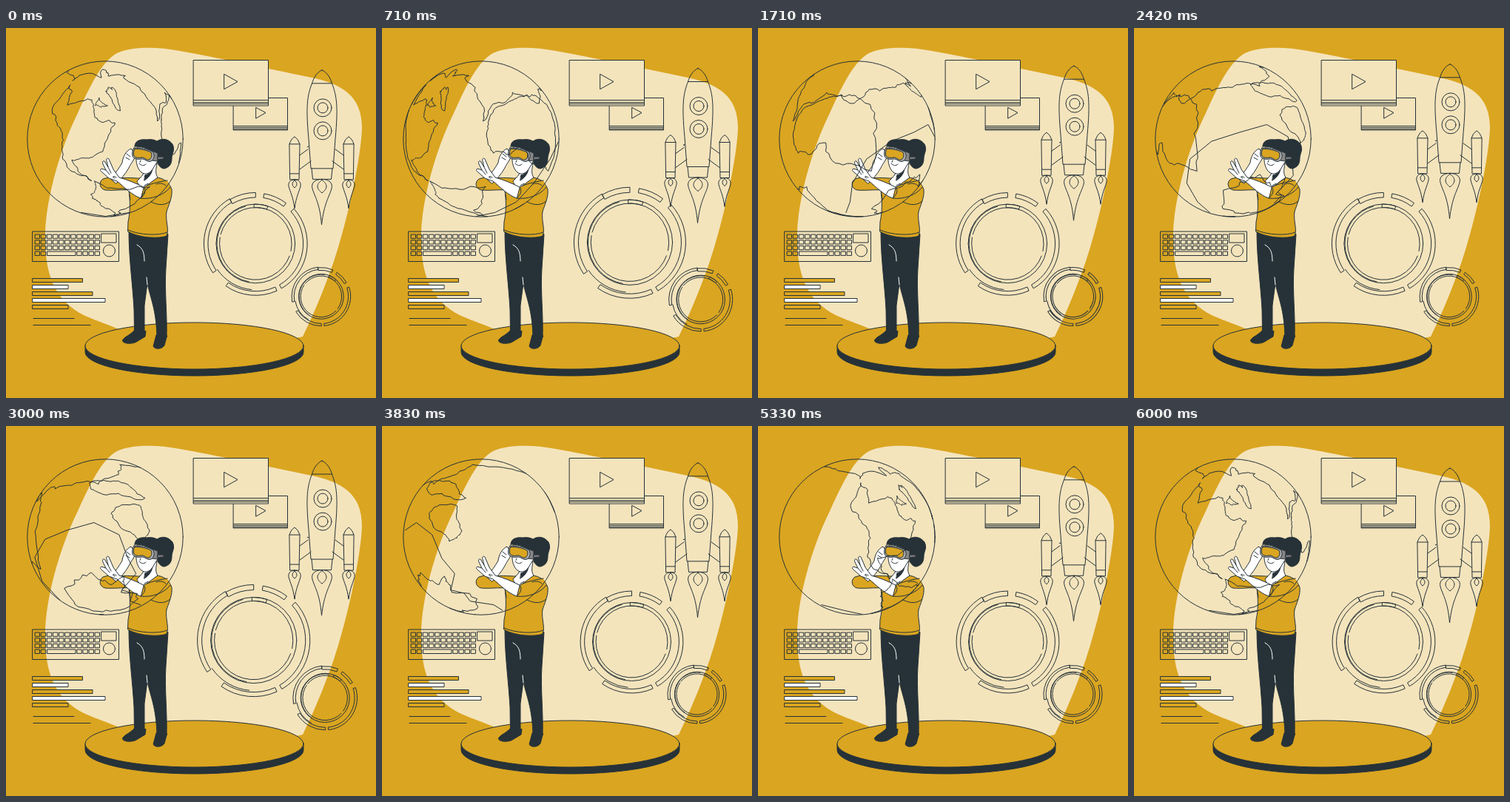
Animation of 500x500 px, one loop 6040 ms. Source, as an HTML page:

```html
<!DOCTYPE html>
<html lang="en">
<head>
<meta charset="utf-8">
<title>Virtual reality</title>
<style>
  html, body { margin: 0; width: 100%; height: 100%; overflow: hidden; background: #daa520; }
  svg { display: block; width: 100vw; height: 100vh; }
  .line { fill: none; stroke: #263238; stroke-width: 1; stroke-linejoin: round; stroke-linecap: round; }
  #rings path { vector-effect: non-scaling-stroke; }
  .cream { fill: #f4e4bc; }
  .gold { fill: #daa520; }
  .white { fill: #fff; }
  .dark { fill: #263238; }
</style>
</head>
<body>
<svg viewBox="0 0 500 500">
  <defs>
    <g id="booster">
      <path d="M383 157Q385 150 390 147Q395 150 397 157L396 205H384ZM383 157H397M384 197H396"/>
      <path d="M390 205C384 205 381 209 382 214C384 222 388 228 390 244C392 228 396 222 398 214C399 209 396 205 390 205Z"/>
      <path d="M390 206C386 209 386 213 390 216C394 213 394 209 390 206Z"/>
      <path d="M397 172L408 164M397 191L412 180"/>
    </g>
  </defs>

  <path class="cream" d="M150 34C165 26 200 24 235 31C285 40 350 54 408 66C455 75 481 92 481 135C480 180 455 290 434 340C424 367 414 390 401 417L300 440L180 420C150 404 122 396 105 388C70 370 54 340 53 290C51 240 72 165 97 115C115 75 130 45 150 34Z"/>

  <g class="line">
    <path class="dark" d="M107 429V438A147.5 32 0 0 0 402 438V429Z"/>
    <ellipse class="gold" cx="254.5" cy="429.5" rx="147.5" ry="31.5"/>

    <rect class="cream" x="307.5" y="94.5" width="73" height="43.5"/>
    <path d="M307.5 132.5H380.5M307.5 134.5H380.5M307.5 136.5H380.5M338 107.5L351 114.5L338 122Z"/>
    <rect class="cream" x="253.5" y="43.5" width="101" height="61.5"/>
    <path d="M253.5 97.5H354.5M253.5 100.5H354.5M253.5 102.5H354.5M295 62.5L313 72.5L295 82.5Z"/>

    <g id="keyboard">
      <rect x="36" y="275" width="116.5" height="40.5"/>
      <rect x="56" y="302" width="38" height="5.5"/>
      <rect x="129" y="278" width="20" height="12"/>
      <circle cx="139.5" cy="301" r="8"/>
    </g>
    <g id="bars">
      <path d="M37 392.5H92M37 401.5H114"/>
    </g>
    <g id="rings"></g>

    <g id="rocket">
      <path d="M427 57C420 60 416 67 413.5 75C407 92 405 106 409 150L412 190H442L445 150C449 106 447 92 440.5 75C438 67 434 60 427 57ZM413.5 75H440.5"/>
      <path d="M413 190L414.5 204.5H439.5L441 190"/>
      <circle cx="428" cy="108" r="12"/><circle cx="428" cy="108" r="7"/>
      <circle cx="428" cy="139" r="12"/><circle cx="428" cy="139" r="7"/>
      <path d="M427 204.5C417 204.5 412 210 414 217C417 228 424 236 426.5 266C430 236 437 228 440 217C442 210 437 204.5 427 204.5Z"/>
      <path d="M427 205.5C419 211 419 217 427 223C435 217 435 211 427 205.5Z"/>
      <circle cx="408" cy="160.500" r=".5"/>
      <use href="#booster"/>
      <use href="#booster" transform="translate(853 0) scale(-1 1)"/>
    </g>

    <g id="woman">
      <path class="dark" d="M173 409C168 415 160 417 157.5 422C157 427 172 428 178 423L188 417L189 410Z"/>
      <path class="dark" d="M203 415L199 430C201 435 211 434 214 429L217.5 416Z"/>
      <path class="dark" d="M166 276C166 310 171 345 173 380L173.5 411L187 413L187 375L191 345C195 365 203 380 204 417L217 418C218 385 214 355 216 325L219 279Z"/>
      <path d="M177 293C184 297 187 302 187 315M190 337L191 347" style="stroke:#fff"/>

      <path class="gold" d="M178 203C166 202 150 203 142 201L131 204C125 208 126 217 134 219C147 220 157 218 166 219C168 235 168 248 165 262L164.500 275C180 284 207 285 217 281C221 272 215 261 217 248C221 236 225 228 224 218C220 207 212 203 204 202Z"/>
      <path d="M165 273C180 280 207 281 218 276M166 219L168 232M222 234C212 242 203 238 196 235"/>

      <path class="white" d="M142 204C148 196 153 189 157 182C158 174 162 166 169 163L175 171C174 178 169 182 166 189C161 198 155 204 149 210Z"/>
      <path d="M163 170L168 174M162 175L167 178"/>

      <path class="white" d="M188 193C185 199 181 203 177 207C180 215 186 220 190 213L205 202C201 196 203 190 204 183Z"/>
      <path class="dark" d="M188 199C193 198 196 194 198 190C197 197 193 202 187 206Z"/>
      <path class="white" d="M176 172C175 182 178 191 183 195C188 199 194 197 198 191L206 178L203 160L178 161Z"/>
      <path d="M180 183C183 186 186 187 189 184M182 179L181 181.500"/>
      <path class="dark" d="M174 160C174 152 182 150 190 151C196 150 201 151 204 153C211 148 220 150 225 157C229 165 224 170 224 176C224 184 221 188 214 190C209 190 207 186 205 183L204 174C196 164 186 160 174 160Z"/>
      <path d="M197 166L205 169L205 180L197 179Z" fill="#888"/>
      <path d="M205 174L213 174L213 177L205 178Z" fill="#777"/>
      <path d="M173 162C181 162 191 163 198 167C202 172 200 178 196 180C191 182 187 176 183 177C179 178 172 177 171 173C170 169 171 164 173 162Z" fill="#aaa"/>
      <path class="gold" d="M174 163.500C181 163 190 165 196 168C198 173 196 177 193 178C189 179 187 174 183 175C178 176 173 175 172.500 171C172 168 173 165 174 163.500Z"/>

      <path class="white" d="M186 215C174 209 164 205 153 202L145 191L139 177C137 175 135 177 136 180L138 188L133 180C131 179 130 181 131 184L135 192L129 190C127 191 127 193 130 195L139 203L150 207C160 215 170 226 182 230Z"/>
      <path d="M138 188L142 196M135 192L140 198M149 202C145 199 142 201 147 203"/>
      <path class="gold" d="M218 206C205 208 194 211 186 215C190 220 187 226 182 230C196 232 214 226 222 215"/>
      <path d="M187 213L192 210M203 211C208 209 213 210 216 213"/>
    </g>

    <circle cx="134" cy="150" r="105.2"/>
    <path id="coast"/>
  </g>
</svg>

<script>
const NS = 'http://www.w3.org/2000/svg';
const LOOP = 6040, TAU = 2 * Math.PI, RAD = Math.PI / 180;
const get = id => document.getElementById(id);

function add(parent, tag, attrs) {
  const el = document.createElementNS(NS, tag);
  for (const name in attrs) el.setAttribute(name, attrs[name]);
  parent.appendChild(el);
  return el;
}

// Keyboard and bars
for (let row = 0; row < 4; row++) {
  for (let col = 0; col < 11; col++) {
    const underSpace = row === 3 && col > 1 && col < 7;
    if (!underSpace) add(get('keyboard'), 'rect', { x: 39.5 + col * 8.1, y: 279 + row * 7.7, width: 6, height: 5.3 });
  }
}
[67.5, 48, 81, 98, 48].forEach((width, i) => add(get('bars'), 'rect', {
  x: 36, y: 338.5 + i * 9, width, height: 5, class: i % 2 ? 'white' : 'gold'
}));

// Dials, angles in degrees clockwise from the right
const polar = (r, deg) => `${r * Math.cos(deg * RAD)} ${r * Math.sin(deg * RAD)}`;
const sweep = (r, from, to, dir) => `A${r} ${r} 0 ${to - from > 180 ? 1 : 0} ${dir} ${polar(r, dir ? to : from)}`;
const arc = (r, from, to) => `M${polar(r, from)}${sweep(r, from, to, 1)}`;
const band = (r1, r2, from, to) => `${arc(r2, from, to)}L${polar(r1, to)}${sweep(r1, from, to, 0)}Z`;

function dial(x, y, scale, turn) {
  add(get('rings'), 'path', {
    transform: `translate(${x} ${y}) scale(${scale}) rotate(${turn})`,
    d: band(64, 69.5, 146, 240) + band(62, 68.5, 240, 270) + band(62.5, 68, 280, 307) +
       band(64, 69.5, 318, 420) + band(64, 69.5, 66, 125) + arc(62, 95, 146) +
       arc(53, 0, 180) + arc(53, 180, 360) + arc(48.5, 20, 190) + arc(48.5, 195, 372) +
       arc(52, 100, 255) + band(48.5, 53, 268, 288)
  });
}
dial(337.5, 291.5, 1, 0);
dial(425.5, 362.5, .57, 24);

// Globe: a few corners (longitude,latitude) per land, roughened into coasts
const lands = [
  '-165,65 -95,70 -82,57 -56,52 -80,27 -97,22 -80,8 -105,20 -124,42',
  '-60,79 -25,80 -44,60',
  '-78,8 -35,-7 -70,-54 -72,-20 -81,-5',
  '-6,35 32,31 51,12 20,-35 9,4 -17,14',
  '-9,38 25,71 105,76 185,66 121,30 104,2 77,8 45,13 35,36',
  '114,-23 136,-12 150,-28 143,-39',
  '97,4 118,6 140,-4 106,-7',
  '-80,73 -62,66 -85,66',
  '-180,-76 -60,-65 60,-67 150,-67 180,-76'
];

let seed = 7;
function random() {
  seed = seed * 16807 % 2147483647;
  return seed / 2147483647 - .5;
}

function roughen(a, b, depth) {
  if (!depth) return [b];
  const dx = b[0] - a[0], dy = b[1] - a[1], k = random() * .5;
  const mid = [(a[0] + b[0]) / 2 - dy * k, (a[1] + b[1]) / 2 + dx * k * .6];
  return [...roughen(a, mid, depth - 1), ...roughen(mid, b, depth - 1)];
}

// Place on the unit sphere as seen at the start of the loop
const LON = -72, TILT = 41 * RAD;
function onSphere([lon, lat]) {
  const d = (lon - LON) * RAD, p = lat * RAD;
  const north = Math.sin(p), front = Math.cos(p) * Math.cos(d);
  return {
    x: Math.cos(p) * Math.sin(d),
    y: north * Math.cos(TILT) - front * Math.sin(TILT),
    z: north * Math.sin(TILT) + front * Math.cos(TILT)
  };
}

const coasts = lands.map(land => {
  const corners = land.split(' ').map(pair => pair.split(',').map(Number));
  const points = corners.flatMap((c, i) => roughen(c, corners[(i + 1) % corners.length], 4));
  return [...points, points[0]].map(onSphere);
});

function coastPath(angle) {
  const c = Math.cos(angle), s = Math.sin(angle);
  let d = '';
  for (const coast of coasts) {
    let pen = 'M';
    for (const { x, y, z } of coast) {
      if (z * c + x * s < 0) { pen = 'M'; continue; }
      d += `${pen}${(134 + 105 * (x * c - z * s)).toFixed(1)} ${(150 - 105 * y).toFixed(1)}`;
      pen = 'L';
    }
  }
  return d;
}

// Linear rise to 1 at the peak and fall back to 0
const beat = (p, start, peak, end) =>
  Math.max(0, Math.min((p - start) / (peak - start), (end - p) / (end - peak)));

function draw(now) {
  const p = (now + 40) % LOOP / LOOP;
  const lift = 10 * (1 - Math.abs(1 - 2 * p));
  const scale = 1 + .1 * (beat(p, 0, .1, .3) + beat(p, .4, .5, .6));
  get('rocket').setAttribute('transform', `translate(0 ${-lift})`);
  get('rings').setAttribute('transform', `translate(366.5 312) scale(${scale}) translate(-366.5 -312)`);
  get('coast').setAttribute('d', coastPath(p * TAU));
}

function tick() {
  draw(performance.now());
  requestAnimationFrame(tick);
}
tick();
</script>
</body>
</html>
```
